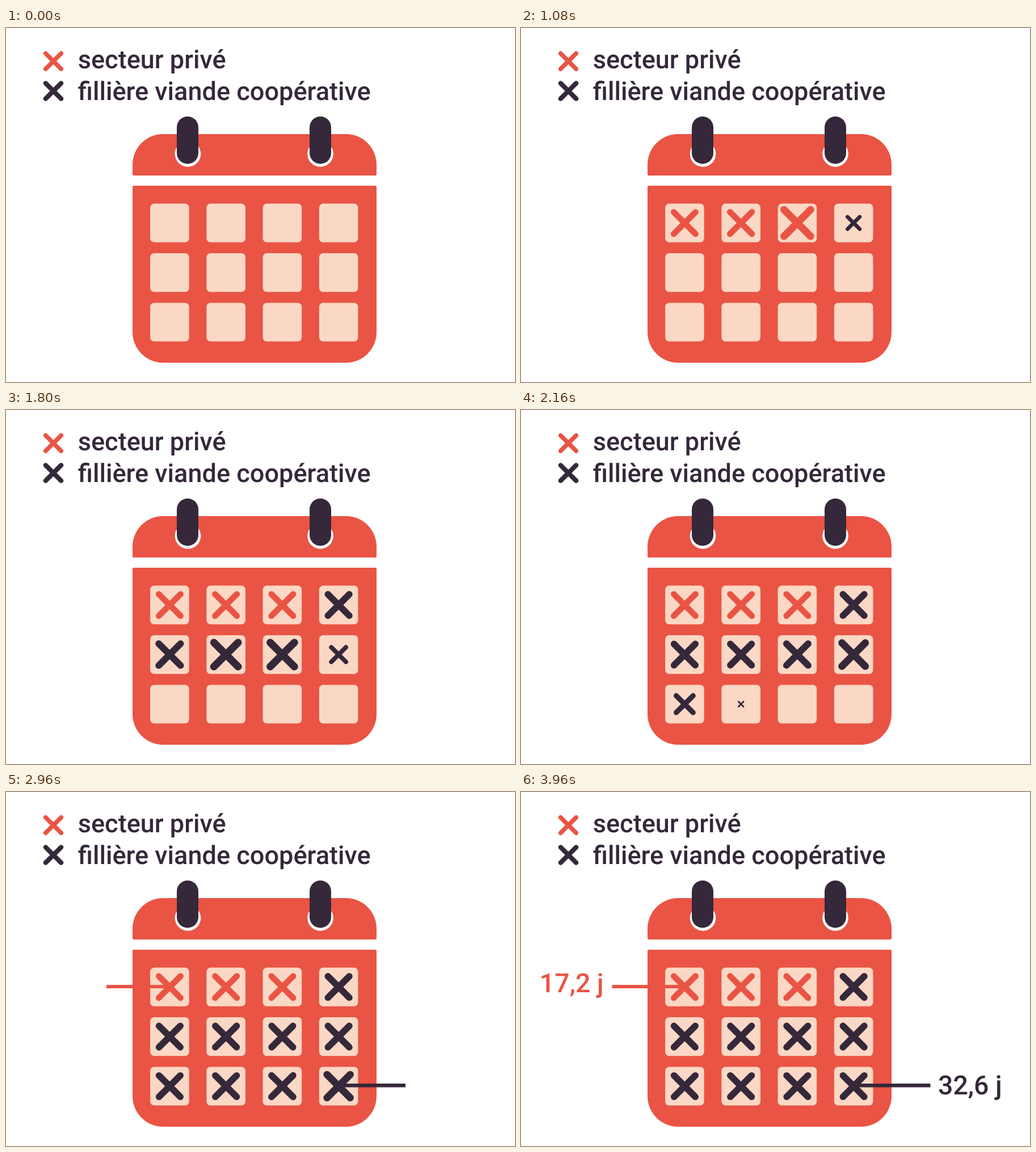
Write an HTML page that moves like this. It is 897 px wide and 624 px high and loops after 4000 ms.

```html
<!DOCTYPE html>
<html lang="fr">
<head>
<meta charset="utf-8">
<style>
html, body { margin: 0; width: 100%; height: 100%; overflow: hidden; background: #fff; }
svg { display: block; width: 100%; height: 100%; }
text { font: 500 45px Roboto, sans-serif; text-rendering: geometricPrecision; }
.value { font-size: 46.5px; }
</style>
</head>
<body>
<svg id="stage" viewBox="0 0 897 624">
  <defs>
    <path id="redX" d="M-19.2-19.2 19.2 19.2M19.2-19.2-19.2 19.2" stroke="#ea5444" stroke-width="10.6" stroke-linecap="round"/>
    <path id="darkX" d="M-18.8-18.8 18.8 18.8M18.8-18.8-18.8 18.8" stroke="#35283a" stroke-width="11.6" stroke-linecap="round"/>
  </defs>
  <use href="#redX" transform="translate(83.5 58.5) scale(.715)"/>
  <use href="#darkX" transform="translate(83.5 111) scale(.725)"/>
  <g fill="#35283a">
    <text x="126.7" y="71">secteur privé</text>
    <text x="126.7" y="127">fillière viande coopérative</text>
  </g>
  <g fill="#ea5444">
    <path d="M223 258V241A54 54 0 0 1 277 187H599A54 54 0 0 1 653 241V258Q653 260 651 260H225Q223 260 223 258Z"/>
    <path d="M223 280Q223 278 225 278H651Q653 278 653 280V536A54 54 0 0 1 599 590H277A54 54 0 0 1 223 536Z"/>
  </g>
  <g fill="#fff"><circle cx="320.5" cy="222" r="22.8"/><circle cx="554" cy="222" r="22.8"/></g>
  <g fill="#35283a">
    <rect x="301" y="156" width="38" height="83.5" rx="19"/>
    <rect x="535" y="156" width="38" height="83.5" rx="19"/>
  </g>
  <g id="cells" fill="#fbd8c5"></g>
  <g id="marks"></g>
  <path id="redLine" stroke="#ea5444" stroke-width="6"/>
  <path id="darkLine" stroke="#35283a" stroke-width="6.6"/>
  <g id="values">
    <text class="value" x="32.8" y="352.5" fill="#ea5444">17,2 j</text>
    <text class="value" x="735" y="532.5" fill="#35283a">32,6 j</text>
  </g>
</svg>
<script>
const LOOP = 4000, RISE = 430, FALL = 400;
const starts = [138, 301, 640, 875, 1065, 1268, 1410, 1560, 1893, 2036, 2190, 2346];
const $ = id => document.getElementById(id);

function add(parent, tag, attrs) {
  const el = document.createElementNS("http://www.w3.org/2000/svg", tag);
  for (const k in attrs) el.setAttribute(k, attrs[k]);
  return parent.appendChild(el);
}

function ease(t, start, length) {
  const u = Math.min(1, Math.max(0, (t - start) / length));
  return u * u * (3 - 2 * u);
}

const marks = starts.map((start, i) => {
  const x = 288.4 + 99.25 * (i % 4), y = 343.7 + 87.4 * Math.floor(i / 4);
  add($("cells"), "rect", { x: x - 34.3, y: y - 34.1, width: 68.6, height: 68.2, rx: 7 });
  const el = add($("marks"), "use", { href: i < 3 ? "#redX" : "#darkX" });
  return { el, x, y, start, peak: i < 4 ? 1.22 : 1.16 };
});

function render(t) {
  for (const { el, x, y, start, peak } of marks) {
    const s = peak * ease(t, start, RISE) - (peak - 1) * ease(t, start + RISE, FALL);
    el.setAttribute("transform", `translate(${x} ${y}) scale(${s})`);
    el.setAttribute("visibility", s > 0 ? "visible" : "hidden");
  }
  const p = ease(t, 2606, 458);
  $("redLine").setAttribute("d", `M288 343H${288 - 127.5 * p}`);
  $("darkLine").setAttribute("d", `M586 517.3H${586 + 135.5 * p}`);
  $("values").setAttribute("opacity", ease(t, 3060, 600));
}

const begin = performance.now();
function tick() {
  render((performance.now() - begin) % LOOP);
  requestAnimationFrame(tick);
}
tick();
</script>
</body>
</html>
```
